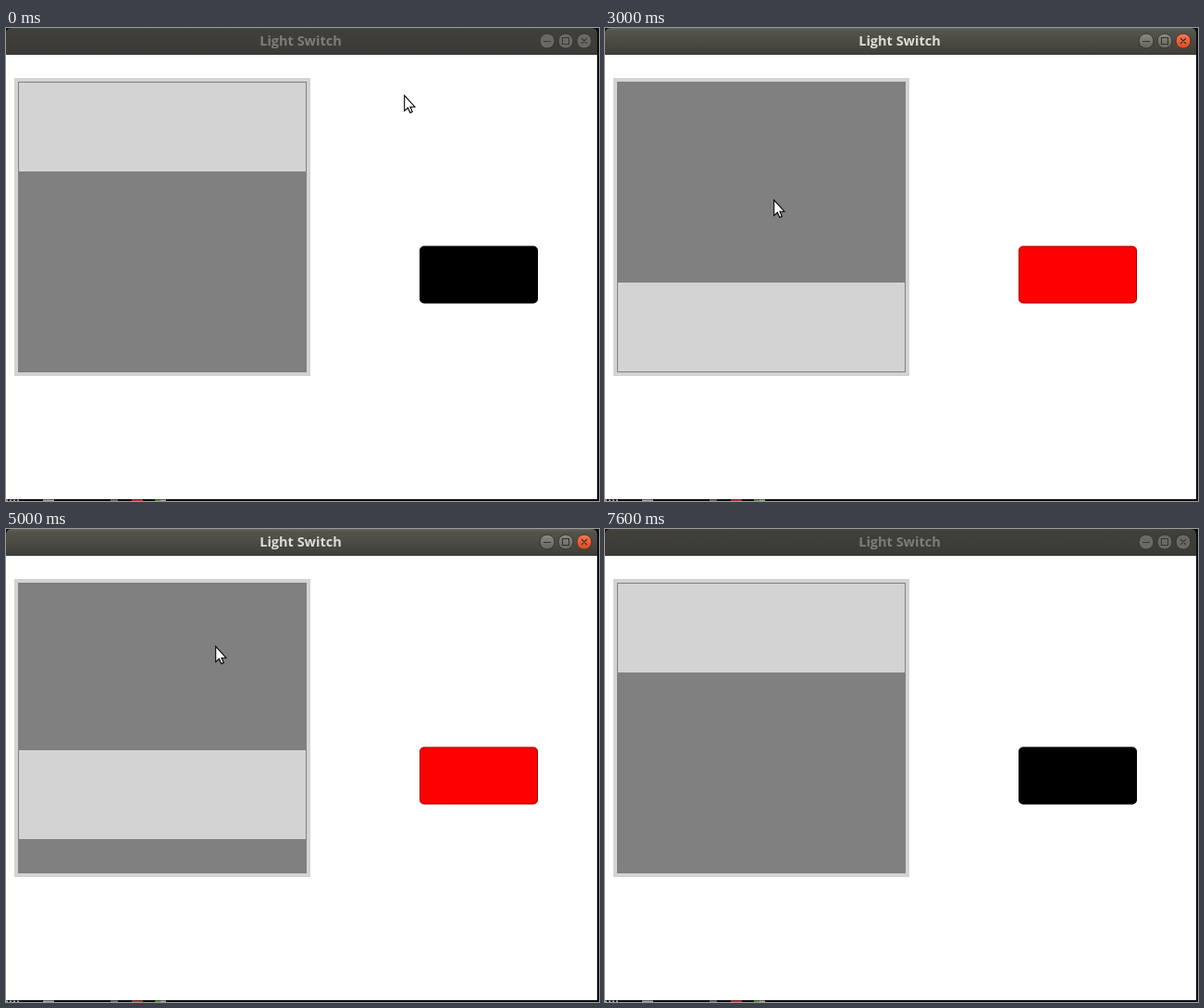
An HTML page for the animation above (7.7 s loop, 641 by 511 pixels).

```html
<!DOCTYPE html>
<html lang="en">
<head>
<meta charset="utf-8">
<title>Light Switch</title>
<style>
  html, body { margin: 0; width: 100%; height: 100%; overflow: hidden; background: #000; }
  svg { display: block; }
  .title { font: 700 14.5px "Open Sans", "Noto Sans", sans-serif; text-anchor: middle; fill: #7f7d78; }
  .bar { fill: url(#barIdle); }
  .button { fill: #6a6963; stroke: #35342f; }
  .glyph { fill: none; stroke: #3a3935; stroke-width: 1.1; }
  .focused .title { fill: #dfdbd2; }
  .focused .bar { fill: url(#barActive); }
  .focused .button { fill: url(#buttonActive); }
  .focused .close { fill: url(#closeActive); stroke: #5a3024; }
  .focused .glyph { stroke: #33322e; }
  .edge { stroke-width: 1.5; }
  .rim { fill: none; stroke: #000; stroke-opacity: .35; }
  .on .light { fill: #fe0000; }
</style>
</head>
<body>
<svg id="stage" width="641" height="511" viewBox="0 0 641 511">
  <defs>
    <linearGradient id="barIdle" x2="0" y2="1">
      <stop stop-color="#454540"/><stop offset=".1" stop-color="#403f3a"/><stop offset="1" stop-color="#3b3a36"/>
    </linearGradient>
    <linearGradient id="barActive" x2="0" y2="1">
      <stop stop-color="#66655b"/><stop offset=".1" stop-color="#55544c"/><stop offset="1" stop-color="#3e3d38"/>
    </linearGradient>
    <linearGradient id="buttonActive" x2="0" y2="1">
      <stop stop-color="#8b8a80"/><stop offset="1" stop-color="#66655e"/>
    </linearGradient>
    <linearGradient id="closeActive" x2="0" y2="1">
      <stop stop-color="#f27b54"/><stop offset="1" stop-color="#dd4a1e"/>
    </linearGradient>
  </defs>

  <!-- Desktop edge behind the window -->
  <rect width="641" height="511" fill="#0c0c0c"/>
  <g class="edge">
    <path d="M0 510.2h15" stroke="#aaa" stroke-dasharray="2 2"/>
    <path d="M40 510.2h12m115 0h6" stroke="#aaa"/>
    <path d="M113 510.2h8" stroke="#777"/>
    <path d="M136 510.2h12" stroke="#c33b3b"/>
    <path d="M161 510.2h6" stroke="#58a03c"/>
  </g>

  <!-- Window -->
  <path class="bar" d="M0 29V6Q0 0 6 0H633Q639 0 639 6V29Z"/>
  <rect y="29" width="639" height="480" fill="#fff"/>
  <text class="title" x="318.5" y="19">Light Switch</text>
  <circle class="button" cx="585" cy="14" r="8"/>
  <circle class="button" cx="605" cy="14" r="8"/>
  <circle class="button close" cx="625" cy="14" r="8"/>
  <path class="glyph" d="M581 14.5h8M601.5 10.5h7v7h-7zM622 11l6 6m0-6l-6 6"/>

  <!-- Switch and light -->
  <rect x="9" y="54" width="320" height="322" fill="#d3d3d3"/>
  <rect x="13" y="58" width="312" height="314" fill="#808080"/>
  <rect id="knob" x="14" y="59" width="310" height="96" fill="#d3d3d3"/>
  <rect class="light" x="447" y="235.5" width="128" height="62" rx="5"/>
  <rect class="rim" x="447.5" y="236" width="127" height="61" rx="4.5"/>

  <g id="cursor">
    <path d="M1.5 2V18.5L5.2 15.2 7.6 20.4 10 19.3 7.8 14.2H12.6Z" opacity=".2"/>
    <path d="M.7 1V17.6L4.4 14.2 6.8 19.5 9.2 18.4 7 13.2H11.9Z" fill="#fff" stroke="#000" stroke-width="1.1"/>
  </g>
</svg>
<script>
  const LOOP = 7700, STEP = 100;
  const TOP = 59, TRAVEL = 216, SLIDE = 200, LAG = 33;
  const SPEED = 100; // pointer pixels per step

  const clicks = [1700, 3400, 4800, 6500];
  const blur = 7600;

  // Where the pointer heads, and when it sets off
  const stops = [
    { at: 0, x: 430, y: 72 },
    { at: 1000, x: 330, y: 220 },
    { at: 1300, x: 227, y: 122 },
    { at: 1900, x: 378, y: 145 },
    { at: 2800, x: 173, y: 238 },
    { at: 3000, x: 182, y: 185 },
    { at: 3700, x: 364, y: 201 },
    { at: 4400, x: 237, y: 117 },
    { at: 4800, x: 226, y: 126 },
    { at: 5200, x: 436, y: 177 },
    { at: 5900, x: 416, y: 225 },
    { at: 6100, x: 138, y: 158 },
    { at: 7000, x: 58, y: 35 },
    { at: 7100, x: -20, y: -40 }
  ];

  const [stage, knob, cursor] = ["stage", "knob", "cursor"].map(id => document.getElementById(id));
  const clamp = v => Math.min(1, Math.max(0, v));
  const mix = (a, b, p) => Math.round(a + (b - a) * p);

  function pointerAt(t) {
    const i = stops.findLastIndex(s => s.at <= t);
    const to = stops[i], from = stops[i - 1] ?? to;
    const steps = Math.max(1, Math.round(Math.hypot(to.x - from.x, to.y - from.y) / SPEED));
    const p = clamp(((t - to.at) / STEP + 1) / steps);
    return [mix(from.x, to.x, p), mix(from.y, to.y, p)];
  }

  function draw(now) {
    const t = Math.floor((now % LOOP) / STEP) * STEP;
    cursor.setAttribute("transform", `translate(${pointerAt(t)})`);

    // Each click flips the light at once; the knob slides after it
    const done = clicks.filter(c => c <= t);
    const on = done.length % 2 === 1;
    const slide = done.length ? clamp((t - done.at(-1) - LAG) / SLIDE) : 1;
    knob.setAttribute("y", mix(TOP, TOP + TRAVEL, on ? slide : 1 - slide));

    stage.classList.toggle("on", on);
    stage.classList.toggle("focused", t >= clicks[0] && t < blur);
  }

  const start = performance.now();
  function tick() {
    draw(performance.now() - start);
    requestAnimationFrame(tick);
  }
  tick();
</script>
</body>
</html>
```
